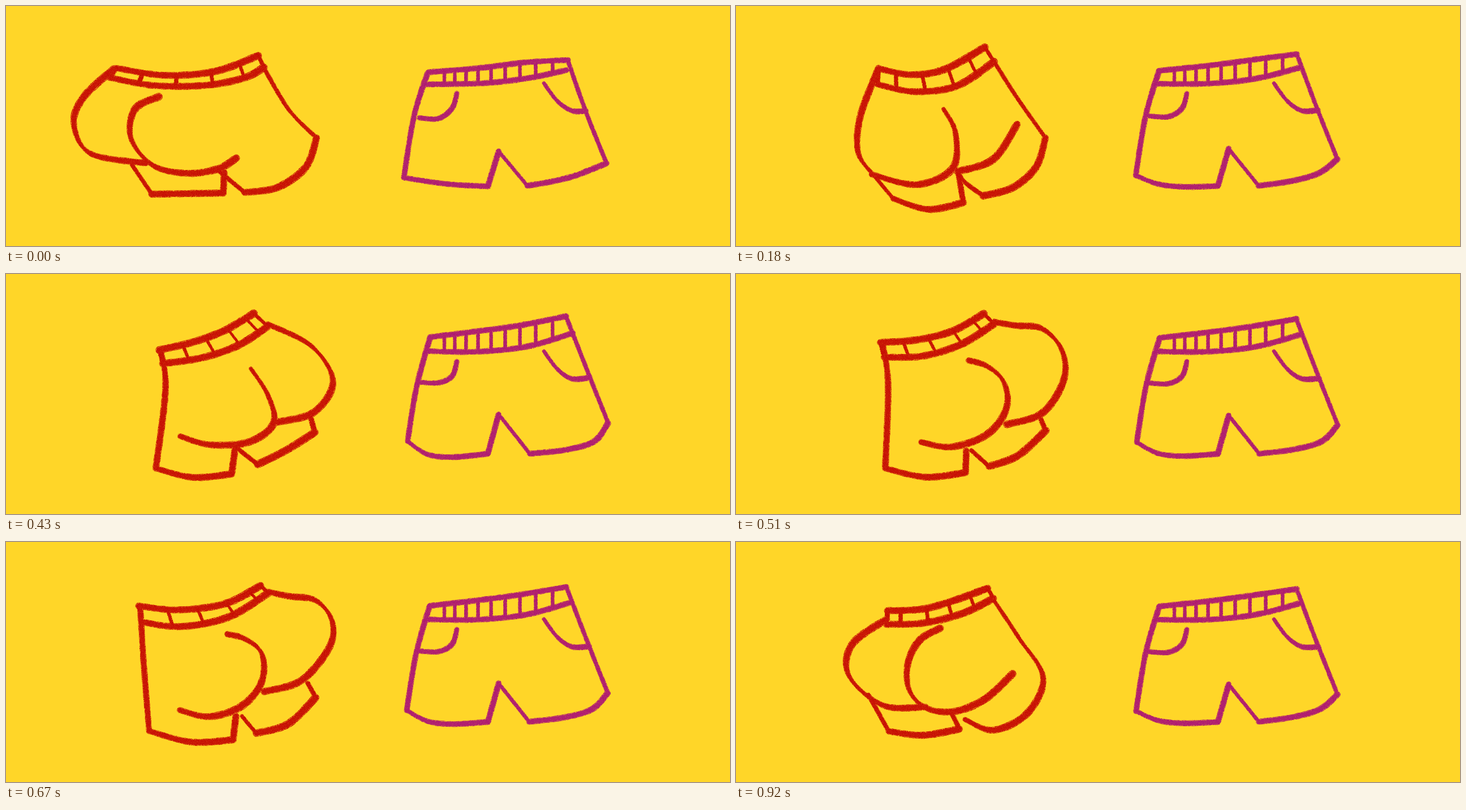
An HTML page with a canvas that plays this animation: 1280 px wide and 426 px high, repeating every 1 s.

```html
<!DOCTYPE html>
<html lang="en">
<head>
<meta charset="utf-8">
<title>Dancing shorts</title>
<style>
html, body { margin: 0; width: 100%; height: 100%; overflow: hidden; background: #ffd628; }
canvas { display: block; }
</style>
</head>
<body>
<canvas id="stage" width="1280" height="426"></canvas>
<script>
const W = 1280, H = 426, SAMPLES = 64;
const PAPER = '#ffd628';
const NIB_ANGLE = 0.87;
const RED_PEN = { color: '#c60c05', thin: 6.5, swell: 7 };
const PLUM_PEN = { color: '#ad1873', thin: 6.5, swell: 4.5 };

const lerp = (a, b, t) => a + (b - a) * t;
const first = line => line.pts[0];
const last = line => line.pts[SAMPLES];

function seeded(seed) {
  return () => {
    seed = (seed + 0x6d2b79f5) | 0;
    let t = Math.imul(seed ^ (seed >>> 15), 1 | seed);
    t ^= t + Math.imul(t ^ (t >>> 7), 61 | t);
    return ((t ^ (t >>> 14)) >>> 0) / 4294967296;
  };
}

function makeCanvas(w, h) {
  const c = document.createElement('canvas');
  c.width = w;
  c.height = h;
  return c;
}

// Evenly spaced samples along a dense path
function resample(path) {
  const sums = [0];
  for (let i = 1; i < path.length; i++) {
    sums.push(sums[i - 1] + Math.hypot(path[i][0] - path[i - 1][0], path[i][1] - path[i - 1][1]));
  }
  const total = sums[sums.length - 1], out = [];
  for (let n = 0, k = 1; n <= SAMPLES; n++) {
    const d = total * n / SAMPLES;
    while (k < path.length - 1 && sums[k] < d) k++;
    const t = (d - sums[k - 1]) / (sums[k] - sums[k - 1]);
    out.push(path[k].map((v, i) => lerp(path[k - 1][i], v, t)));
  }
  return out;
}

// Smooth line through key points
function curve(keys, weight = 1) {
  const end = keys.length - 1;
  const at = i => keys[Math.max(0, Math.min(end, i))];
  const path = [];
  for (let n = 0; n <= end * 24; n++) {
    const i = Math.min(end - 1, Math.floor(n / 24)), t = n / 24 - i;
    path.push([0, 1].map(k => {
      const [a, b, c, d] = [at(i - 1)[k], at(i)[k], at(i + 1)[k], at(i + 2)[k]];
      return b + t / 2 * (c - a + t * (2 * a - 5 * b + 4 * c - d + t * (3 * (b - c) + d - a)));
    }));
  }
  return { pts: resample(path), weight };
}

// "x,y x,y / x,y": a slash is a sharp corner at the point before it
function outline(text, weight) {
  let corner = [];
  return text.split('/').map(part => {
    const keys = [...corner, ...part.trim().split(/\s+/).map(p => p.split(',').map(Number))];
    corner = keys.slice(-1);
    return curve(keys, weight);
  });
}

const mix = (a, b, t) => a.map((line, i) => ({
  weight: line.weight,
  pts: line.pts.map((p, j) => p.map((v, k) => lerp(v, b[i].pts[j][k], t)))
}));

// Back view: waistband with stitches that slide along it, then the body lines
function back(slide, top, seam, ...body) {
  const [upper] = outline(top), [lower] = outline(seam);
  const stitches = [0.2, 0.44, 0.67, 0.88].map(u => {
    const n = Math.round((u + slide) * SAMPLES);
    return curve([upper.pts[n], lower.pts[n]], 0.65);
  });
  return [
    upper, lower, ...stitches,
    curve([first(upper), first(lower)], 0.75),
    curve([last(upper), last(lower)], 0.85),
    ...body.flatMap(text => outline(text))
  ];
}

const swingLeft = back(-0.02,
  '194,110 280,123 370,116 446,88',
  '183,127 260,141 350,141 420,128 456,109',
  '190,112 137,162 120,210 150,262 247,279',
  '456,110 500,184 549,234 / 530,286 480,322 422,331 / 374,291',
  '222,281 258,334 / 384,332 / 386,295',
  '270,161 228,183 221,235 260,283 320,297 375,289 407,270');

const leftReturn = back(0.03,
  '195,116 270,125 375,113 447,88',
  '192,127 250,149 320,159 400,146 457,115',
  '193,117 148,156 133,198 160,246 215,266 270,270',
  '458,118 487,172 515,210 544,241 / 526,279 485,315 430,329 / 405,304 374,286',
  '214,267 250,295 285,324 / 340,330 386,325 / 391,303',
  '285,179 240,186 231,228 255,262 300,281 360,284 411,266');

const rightArrive = back(0.06,
  '230,119 300,128 395,117 462,84',
  '234,148 300,158 400,144 478,97',
  '230,119 228,200 243,326 / 315,350 390,352 / 404,300',
  '409,300 435,334 / 495,315 546,277 / 528,241',
  '478,96 553,143 566,200 510,245 435,260',
  '268,288 315,310 370,310 418,287 428,243 393,188');

const swingRight = back(0.03,
  '271,135 330,121 385,101 438,70',
  '277,159 345,149 410,127 463,93',
  '274,135 282,205 265,345 / 330,361 399,355 / 405,310',
  '407,308 445,338 / 495,313 546,281 / 539,256',
  '463,89 540,128 578,190 545,245 480,263',
  '308,288 360,303 430,298 473,265 463,215 433,168');

const bounce = back(-0.02,
  '239,108 310,113 380,102 438,71',
  '247,136 315,142 385,123 450,84',
  '244,108 256,190 263,345 / 340,360 413,350 / 409,318',
  '425,318 450,345 / 505,330 549,275 / 539,260',
  '450,81 495,80 545,70 584,105 585,165 545,245 478,271',
  '347,309 405,312 465,275 489,215 475,148 430,129 390,139');

const rest = back(-0.05,
  '252,111 310,122 370,112 440,73',
  '250,139 315,152 390,142 456,99',
  '252,111 220,195 216,260 243,300 / 278,342 / 340,361 402,349 / 393,296',
  '454,95 495,160 547,234 / 531,285 490,322 437,337 / 405,313 390,291',
  '240,299 320,317 383,288 388,225 367,183',
  '497,210 455,272 392,294');

const windUp = back(-0.07,
  '268,122 330,119 385,104 445,82',
  '266,146 330,144 400,127 455,100',
  '266,137 205,182 200,238 260,290 335,293',
  '455,102 500,170 543,240 515,304 455,334 405,315',
  '234,271 270,336 / 330,343 395,332 / 380,301',
  '361,153 325,174 304,215 306,262 335,294 385,301 440,279 489,234');

// Front view: waist, seam, sides, hems, legs; one outline lowered, one lifted
const frame2d = (...texts) => texts.flatMap(text => outline(text));
const lowered = frame2d(
  '748,117 840,109 920,99 993,94',
  '745,139 845,137 923,128 992,113',
  '993,95 1025,185 1062,278',
  '746,118 722,195 704,304 / 750,313 795,318 852,320 / 871,257 / 922,319 / 970,311 1015,299 1062,278');
const lifted = frame2d(
  '750,112 830,102 910,91 990,75',
  '745,137 830,138 920,129 1002,105',
  '990,75 1033,185 1064,263',
  '750,112 726,200 710,297 / 745,320 790,325 852,319 / 871,249 / 926,319 / 990,312 1040,297 1064,265');

const nearest = (line, axis, value) => line.pts.reduce((a, b) =>
  Math.abs(b[axis] - value) < Math.abs(a[axis] - value) ? b : a);

function front(lift) {
  const lines = mix(lowered, lifted, lift);
  const [waist, seam, side] = lines;
  for (let i = 0; i < 9; i++) {
    const x = 775 + 17.5 * i + 0.8 * i * i;
    lines.push(curve([[x, nearest(waist, 0, x)[1]], [x, nearest(seam, 0, x)[1]]], 0.65));
  }
  const hip = 199 - 6 * lift;
  lines.push(curve([[797, 155], [789, 181], [765, hip], [731, hip - 1]], 0.9));
  lines.push(curve([[951, 137], [975, 169], [1001, 186], nearest(side, 1, 185)]));
  return lines;
}

// How long each drawing stays, the red shorts, the lift of the plum shorts
const steps = [
  [100, swingLeft, -0.1],
  [80, leftReturn, 0.1],
  [80, rest, 0.45],
  [170, rightArrive, 0.8],
  [80, swingRight, 1],
  [80, mix(swingRight, bounce, 0.5), 0.75],
  [80, bounce, 0.5],
  [80, mix(bounce, rightArrive, 0.5), 0.75],
  [170, rest, 1],
  [80, windUp, 0.55]
];
const LOOP = steps.reduce((sum, [hold]) => sum + hold, 0);

// Speckles that wear the crayon away
function grain(strength, seed) {
  const size = 160, tile = makeCanvas(size, size), g = tile.getContext('2d');
  const rand = seeded(seed), img = g.createImageData(size, size);
  for (let i = 3; i < img.data.length; i += 4) img.data[i] = 255 * strength * rand() ** 2;
  g.putImageData(img, 0, 0);
  return tile;
}
const coarse = grain(0.75, 11), fine = grain(0.15, 29);

function wear(g, tile) {
  g.globalCompositeOperation = 'destination-out';
  g.fillStyle = g.createPattern(tile, 'repeat');
  g.fillRect(0, 0, W, H);
  g.globalCompositeOperation = 'source-over';
}

// A flat nib: thin along its own angle, broad across it
function trace(g, { pts, weight }, pen, scale, rand) {
  g.strokeStyle = pen.color;
  for (let i = 1; i < pts.length; i++) {
    const [x0, y0] = pts[i - 1], [x1, y1] = pts[i];
    const across = Math.abs(Math.sin(Math.atan2(y1 - y0, x1 - x0) - NIB_ANGLE));
    g.lineWidth = (pen.thin + pen.swell * across) * weight * scale * lerp(0.93, 1.07, rand());
    g.beginPath();
    g.moveTo(x0, y0);
    g.lineTo(x1, y1);
    g.stroke();
  }
}

function render([, red, lift], index) {
  const c = makeCanvas(W, H), g = c.getContext('2d');
  const rand = seeded(100 + index), plum = front(lift);
  const layer = scale => {
    red.forEach(line => trace(g, line, RED_PEN, scale, rand));
    plum.forEach(line => trace(g, line, PLUM_PEN, scale, rand));
  };
  g.lineCap = 'round';
  layer(1);
  wear(g, coarse);
  layer(0.7);
  wear(g, fine);
  return c;
}

const drawings = steps.map(render);
const ctx = document.getElementById('stage').getContext('2d');

function play() {
  let t = performance.now() % LOOP, index = 0;
  while (t >= steps[index][0]) t -= steps[index++][0];
  ctx.fillStyle = PAPER;
  ctx.fillRect(0, 0, W, H);
  ctx.drawImage(drawings[index], 0, 0);
  requestAnimationFrame(play);
}
play();
</script>
</body>
</html>
```
